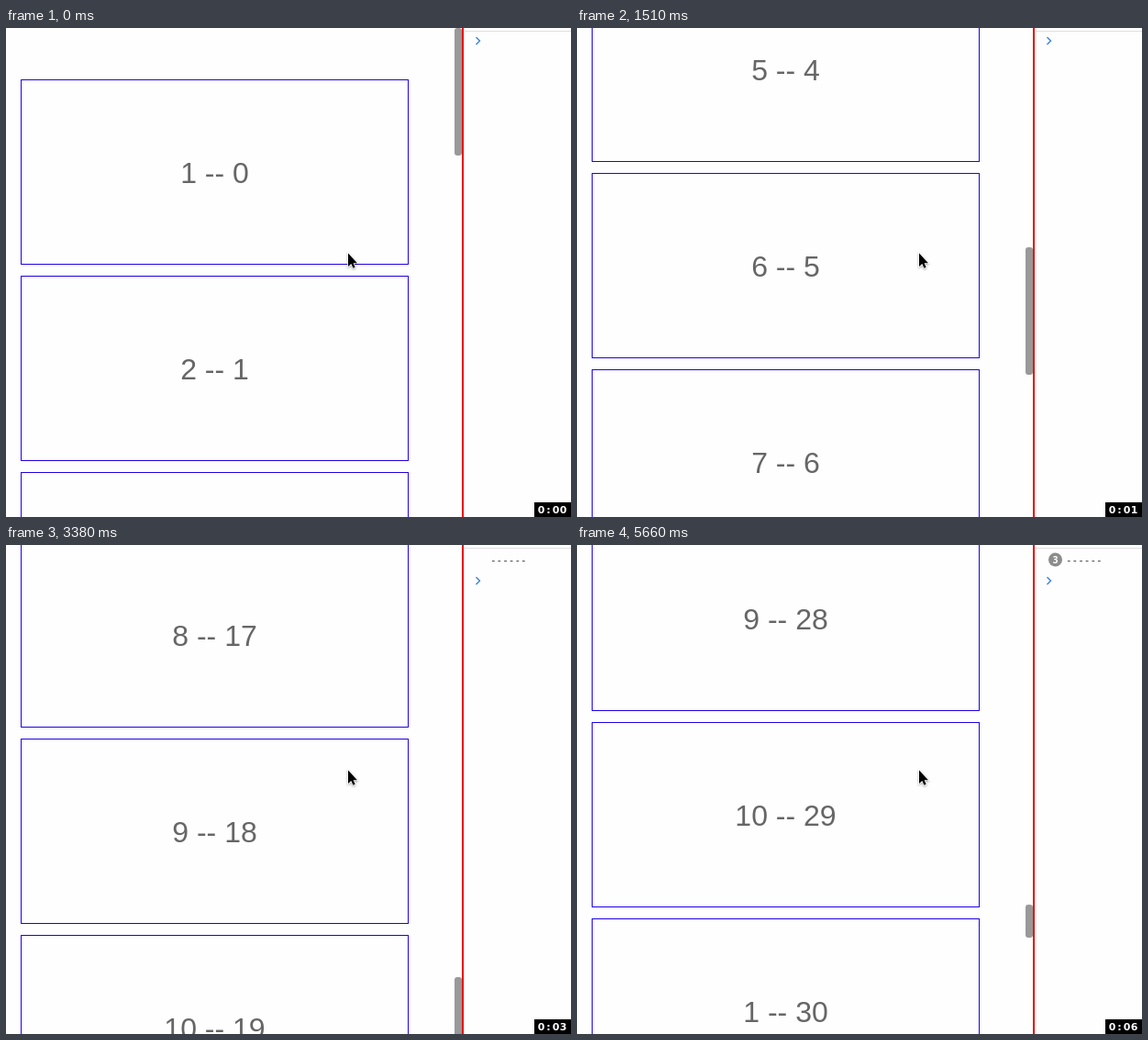
Write an HTML page that moves like this. It is 616 by 533 pixels and loops after 6.25 s.

```html
<!DOCTYPE html>
<html lang="en">
<head>
<meta charset="utf-8">
<title>Infinite scroll</title>
<style>
  html, body { margin: 0; width: 100%; height: 100%; overflow: hidden; background: #fefefe; }
  svg { display: block; }
  .card rect { fill: none; stroke: #1c00e6; }
  .card text { font: 32px "Liberation Sans", Arial, sans-serif; fill: #666; text-anchor: middle; }
  #log { font: 11px "DejaVu Sans Mono", monospace; fill: #333; }
  #badge text { font: bold 10px "Open Sans", sans-serif; fill: #fff; text-anchor: middle; }
  #clock { font: bold 11px "DejaVu Sans", sans-serif; fill: #fff; text-anchor: middle; }
</style>
</head>
<body>
<svg width="616" height="533" viewBox="0 0 616 533">
  <g id="list"></g>
  <rect id="thumb" x="489" width="8" rx="3" fill="#999"/>
  <path d="M498 0V533" stroke="#e60000" stroke-width="2"/>
  <path d="M500 3.5H616" stroke="#e0e0e0"/>
  <text id="log" y="20">------</text>
  <g id="badge">
    <circle cx="521.5" cy="16" r="7.5" fill="#8c8c8c"/>
    <text id="count" x="521.5" y="19.6"></text>
  </g>
  <path id="prompt" d="M512.5 -4L516.5 0L512.5 4" fill="none" stroke="#3c80d8" stroke-width="1.4"/>
  <path d="M373 245.500V260L376.300 257L378.400 261.800L380.700 260.800L378.600 256.200H383Z"
        fill="#000" stroke="#fff" stroke-width="1.6" paint-order="stroke"
        style="filter: drop-shadow(0 1px 1px #0005)"/>
  <rect x="576" y="517" width="40" height="16"/>
  <text id="clock" y="528.500"></text>
</svg>
<script>
const LOOP = 6250;
const PITCH = 214, PAGE = 10, VIEW = 562;

// Scroll curve: time, offset, speed in px per ms
const CURVE = [
  [180, 0, 0], [940, 345, 0.9], [2110, 1830, 1.4], [2840, 2949, 1.5],
  [4010, 4563, 1.5], [4650, 5645, 1.6], [5010, 6069, 0]
];

// Bursts of screen updates: first, last, count
const BURSTS = [
  [180, 800, 24], [830, 1430, 18], [1460, 2080, 21], [2110, 2730, 21],
  [2760, 3380, 23], [3410, 4010, 18], [4040, 4650, 18], [4700, 5010, 10]
];

const updates = BURSTS.flatMap(([first, last, count]) =>
  Array.from({ length: count }, (_, i) =>
    Math.round((first + (last - first) * i / (count - 1)) / 10) * 10));

const $ = id => document.getElementById(id);
const show = (id, visible) => $(id).setAttribute("visibility", visible ? "visible" : "hidden");

$("list").innerHTML = Array.from({ length: 4 * PAGE }, (_, i) => `
  <g class="card" transform="translate(0 ${56 + PITCH * i})">
    <rect x="16.5" y="0.5" width="422" height="201"/>
    <text x="227.5" y="113">${i % PAGE + 1} -- ${i}</text>
  </g>`).join("");
const cards = [...$("list").children];

function scrollAt(time) {
  if (time <= CURVE[0][0]) return 0;
  const next = CURVE.findIndex(point => time <= point[0]);
  if (next < 0) return CURVE.at(-1)[1];
  const [t0, y0, v0] = CURVE[next - 1], [t1, y1, v1] = CURVE[next];
  const d = t1 - t0, u = (time - t0) / d, w = 1 - u;
  return w * w * ((1 + 2 * u) * y0 + u * d * v0) + u * u * ((1 + 2 * w) * y1 - w * d * v1);
}

function draw(t) {
  const shown = updates.findLast(time => time <= t) ?? 0;
  const offset = Math.round(scrollAt(shown));
  const pages = 1 + Math.floor((offset + 487) / (PITCH * PAGE));
  const loads = pages - 1;

  $("list").setAttribute("transform", `translate(0 ${-offset})`);
  cards.forEach((card, i) => card.style.display = i < pages * PAGE ? "" : "none");

  const ratio = VIEW / (PITCH * PAGE * pages + 135);
  $("thumb").setAttribute("y", Math.round(offset * ratio));
  $("thumb").setAttribute("height", Math.round(VIEW * ratio));

  show("log", loads > 0);
  show("badge", loads > 1);
  $("log").setAttribute("x", loads > 1 ? 533 : 528);
  $("count").textContent = loads;
  $("prompt").setAttribute("transform", `translate(0 ${loads ? 39 : 14})`);

  const seconds = Math.max(0, Math.floor((t - 960) / 940) + 1);
  $("clock").innerHTML = [..."0:0" + seconds]
    .map((char, i) => `<tspan x="${583.5 + 8 * i}">${char}</tspan>`).join("");
}

const start = performance.now();
function tick() {
  draw((performance.now() - start) % LOOP);
  requestAnimationFrame(tick);
}
tick();
</script>
</body>
</html>
```
